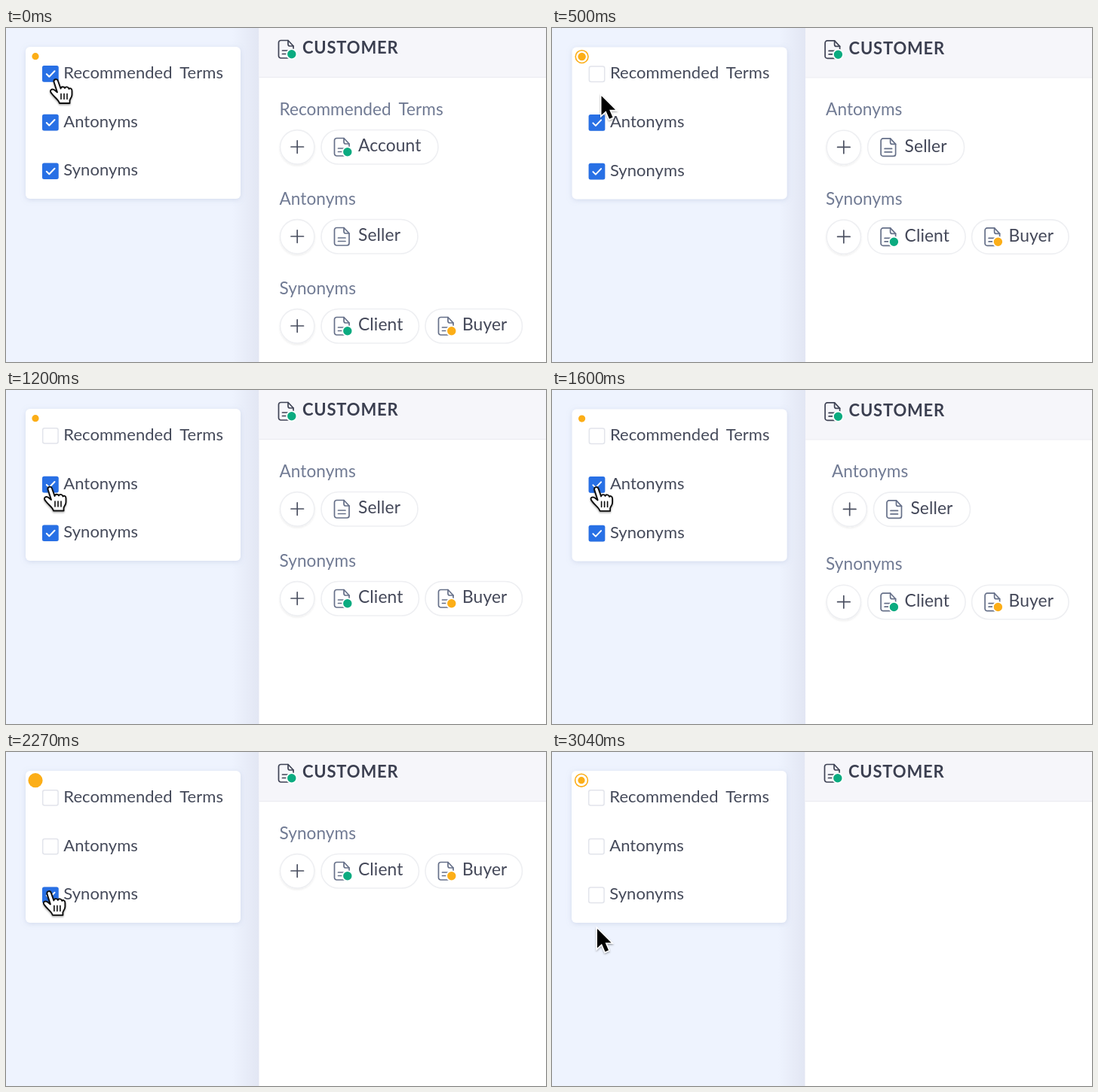
An HTML page that plays this animation: 716 by 444 pixels, repeating every 3080 ms.

```html
<!DOCTYPE html>
<html lang="en">
<head>
<meta charset="utf-8">
<title>Customer terms</title>
<style>
  html, body { margin: 0; width: 716px; height: 444px; overflow: hidden; background: #eef3fe; }
  svg { display: block; font-family: Lato, "Open Sans", sans-serif; }
  text { word-spacing: 4.5px; }
  .option { font-size: 22px; fill: #454a5a; letter-spacing: .05px; }
  .label { font-size: 22.6px; fill: #717b94; letter-spacing: .05px; }
  .term { font-size: 22.8px; fill: #444859; letter-spacing: .1px; }
  .line { fill: none; stroke-width: 1.7; stroke-linecap: round; stroke-linejoin: round; }
  .pill { fill: #fff; stroke: #eeeff2; stroke-width: 1.6; }
</style>
</head>
<body>
<svg width="716" height="444" viewBox="0 0 716 444">
  <defs>
    <linearGradient id="edge">
      <stop offset="0" stop-color="#e2e6f3" stop-opacity="0"/>
      <stop offset="1" stop-color="#e2e6f3"/>
    </linearGradient>
    <filter id="soft" x="-10%" y="-10%" width="120%" height="125%">
      <feDropShadow dx="0" dy="1.5" stdDeviation="3.5" flood-color="#8e9cc4" flood-opacity=".28"/>
    </filter>
    <filter id="lift" x="-20%" y="-20%" width="140%" height="150%">
      <feDropShadow dx="0" dy="1.5" stdDeviation="1" flood-color="#000" flood-opacity=".07"/>
    </filter>
    <filter id="shade" x="-30%" y="-30%" width="170%" height="170%">
      <feDropShadow dx="0" dy="1.5" stdDeviation="1.2" flood-color="#000" flood-opacity=".35"/>
    </filter>
    <clipPath id="panel"><rect x="336" y="0" width="390" height="460"/></clipPath>
    <g id="doc" class="line">
      <path d="M4 1H13.5L20.5 8.5V21.5A3 3 0 0 1 17.5 24.5H4A3 3 0 0 1 1 21.5V4A3 3 0 0 1 4 1Z"/>
      <path d="M13.5 1V6A2.5 2.5 0 0 0 16 8.5H20.5M6 14.5H15.5M6 19H15.5"/>
    </g>
  </defs>
  <g id="scene">
    <rect x="300" y="-5" width="36" height="460" fill="url(#edge)"/>
    <rect x="335.500" y="-5" width="390" height="460" fill="#fff"/>
    <rect x="335.500" y="-5" width="390" height="70" fill="#f6f6fa"/>
    <rect x="335.500" y="65" width="390" height="1" fill="#ebebf0"/>
    <g id="heading"></g>
    <text x="393" y="34.400" font-size="22" font-weight="700" letter-spacing=".8" fill="#3b3f50">CUSTOMER</text>
    <g id="groups" clip-path="url(#panel)"></g>
    <rect x="26" y="25" width="285" height="202" rx="6" fill="#fff" filter="url(#soft)"/>
    <g id="options"></g>
    <circle id="ring" cx="39" cy="37.700" fill="none" stroke="#fcae17" stroke-width="1.6"/>
    <circle id="dot" cx="39" cy="37.700" fill="#fcae17"/>
    <g id="cursor" filter="url(#shade)">
      <g id="hand" fill="#fff" stroke="#111" stroke-width="1.9" stroke-linejoin="round" stroke-linecap="round">
        <path d="M-2.5 3C-3-1 2-1.5 3 2L6.5 12C7 9 11 9 12 11.500C13 9 16.500 9.500 17.500 12.500C18.500 11 21.500 11.500 21.500 15V20C21.500 24 19 25 18.500 28V31.500H5C4 27-2 23.500-5.500 18.500C-9.500 14-5 11.500-1 14.500L2 17Z"/>
        <path d="M7 19V26M11 19V26M15 19V26" fill="none" stroke-width="1.6"/>
      </g>
      <path id="arrow" d="M0 0V25.500L6 20L10.500 30.500L15 28.500L10.600 18.500H18.500Z" fill="#000" stroke="#fff" stroke-width="3" paint-order="stroke"/>
    </g>
  </g>
</svg>
<script>
const $ = id => document.getElementById(id);
const LOOP = 3080, GREEN = '#0bab80', AMBER = '#fcae17';
const CLICKS = [33, 1505, 2664];
const GROUPS = [
  ['Recommended Terms', ['Account', 418, 155, GREEN]],
  ['Antonyms', ['Seller', 418, 128]],
  ['Synonyms', ['Client', 418, 129.5, GREEN], ['Buyer', 556, 128.5, AMBER]]
];
// Pointer tip: time, x, y
const PATH = [
  [360, 66, 68.5], [770, 62, 147], [1060, 58, 129],
  [1700, 58, 129], [1870, 60, 160], [2030, 60, 176],
  [2070, 60, 176], [2460, 54, 194],
  [2850, 54, 194], [3040, 60, 235]
];
// Intervals in which the whole view sits slightly lower right
const NUDGES = [[30, 550], [1530, 1800], [2670, 2950]];

const clamp = u => Math.max(0, Math.min(1, u));
const smooth = u => (u = clamp(u), u * u * (3 - 2 * u));
const part = (t, from, to) => clamp((t - from) / (to - from));

const doc = (x, y, color, status) =>
  `<g transform="translate(${x} ${y})"><use href="#doc" stroke="${color}"/>` +
  (status ? `<circle cx="18.300" cy="19.300" r="6.600" fill="${status}" stroke="#fff" stroke-width="1.800"/>` : '') + '</g>';

const chip = ([name, x, width, status]) =>
  `<rect class="pill" x="${x}" y="135.500" width="${width}" height="45.500" rx="22.700"/>` +
  doc(x + 16.5, 145.5, '#667089', status) +
  `<text class="term" x="${x + 49}" y="164.200">${name}</text>`;

$('heading').innerHTML = doc(360.5, 15.5, '#3f4355', GREEN);
$('groups').innerHTML = GROUPS.map(([name, ...chips]) =>
  `<g><text class="label" x="362.500" y="115.500">${name}</text>
   <circle class="pill" cx="386.200" cy="158.300" r="22.700" filter="url(#lift)"/>
   <path class="line" stroke="#4a4f60" d="M378 158H394.500M386.200 149.800V166.300"/>
   ${chips.map(chip).join('')}</g>`).join('');
$('options').innerHTML = GROUPS.map(([name], i) =>
  `<g transform="translate(0 ${64.7 * i})">
   <rect x="48.700" y="50.700" width="20.400" height="20.400" rx="2.500" stroke-width="1.500"/>
   <g><rect x="48" y="50" width="21.700" height="21.700" rx="2.500" fill="#2870e5"/>
   <path class="line" stroke="#fff" style="stroke-width:2" d="M53.800 61.300L57.300 64.800L64.500 57.300"/></g>
   <text class="option" x="76.300" y="67">${name}</text></g>`).join('');

// Leaving group: small swing right, then away to the left
const slide = a => a <= 0 ? 0
  : a < 62 ? 23 * Math.sin(Math.PI / 2 * a / 62)
  : 23 - .0901 * (a - 62) ** 1.453;
// Groups below: small dip, then up by one row
const rise = a => 4.5 * smooth(a / 80) - 123.5 * smooth((a - 90) / 270);

function pointer(t) {
  const i = PATH.findIndex(p => p[0] > t);
  if (i < 0) return PATH[PATH.length - 1].slice(1);
  if (!i) return PATH[0].slice(1);
  const [t0, x0, y0] = PATH[i - 1], [t1, x1, y1] = PATH[i];
  const u = smooth(part(t, t0, t1));
  return [x0 + (x1 - x0) * u, y0 + (y1 - y0) * u];
}

function pulse(t) {
  const age = t - (CLICKS.filter(c => c <= t).pop() ?? -LOOP);
  const grown = age < 780 ? smooth(part(age, 400, 700)) : Math.exp((780 - age) / 70);
  $('dot').setAttribute('r', 4.6 + 5 * grown);
  $('ring').setAttribute('r', 5 + 3.4 * part(age, 305, 355));
  $('ring').style.opacity = age > 305 && age < 750 ? 1 : 0;
}

function draw(t) {
  const nudged = NUDGES.some(([a, b]) => t >= a && t < b);
  $('scene').setAttribute('transform', nudged ? 'translate(.6 .4)' : '');

  const [x, y] = pointer(t);
  const row = (y - 50) / 65, over = (y - 50) % 65 < 22;
  $('cursor').setAttribute('transform', `translate(${x} ${y})`);
  $('hand').style.display = over ? '' : 'none';
  $('arrow').style.display = over ? 'none' : '';

  let lift = 0;
  CLICKS.forEach((click, i) => {
    const age = t - click, group = $('groups').children[i];
    group.setAttribute('transform', `translate(${slide(age)} ${119 * i + lift})`);
    group.style.display = age > 420 ? 'none' : '';
    lift += rise(age);

    const [box, tick] = $('options').children[i].children;
    const hover = over && Math.floor(row) === i;
    box.setAttribute('fill', hover ? '#e3ebfc' : '#fff');
    box.setAttribute('stroke', hover ? '#cdd6ec' : '#e2e4eb');
    tick.style.opacity = 1 - part(age, 110, 170);
  });
  pulse(t);
}

const start = performance.now();
function frame() {
  draw((performance.now() - start) % LOOP);
  requestAnimationFrame(frame);
}
frame();
</script>
</body>
</html>
```
